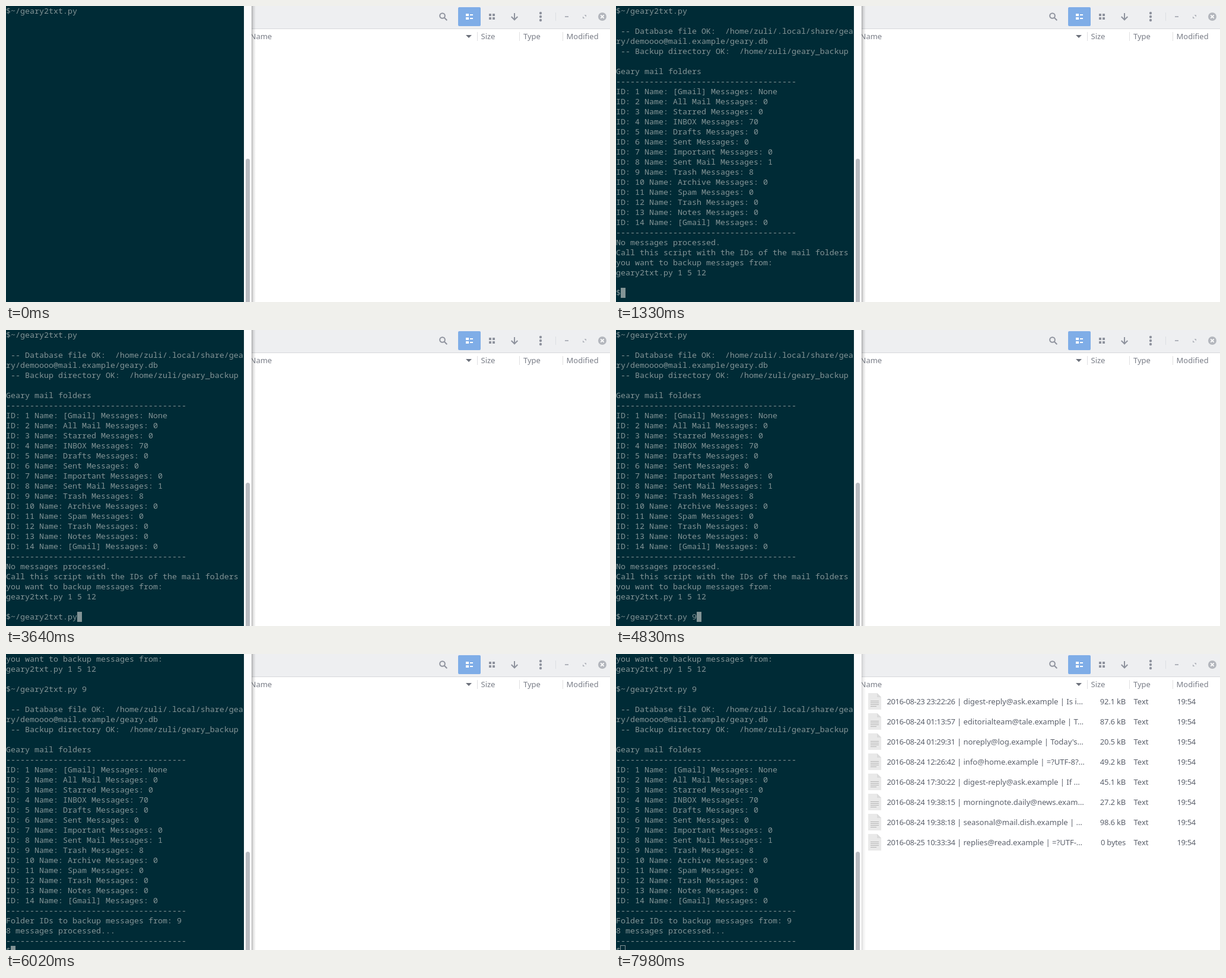
An HTML page that plays this animation: 1018 px wide and 500 px high, repeating every 8050 ms.

```html
<!DOCTYPE html>
<html lang="en">
<head>
<meta charset="utf-8">
<title>Mail backup</title>
<style>
  html, body { margin: 0; width: 100%; height: 100%; overflow: hidden; background: #fff; }
  svg { display: block; width: 1018px; height: 500px; }
  text { white-space: pre; }
  #term { font: 13.333px "Noto Sans Mono", "DejaVu Sans Mono", monospace; fill: #839496; }
  #files { font: 13px "Noto Sans", "Open Sans", sans-serif; fill: #5c616c; }
  .head { fill: #7a7e88; }
  .digits { letter-spacing: -.41px; }
  .icon { fill: #8f939e; }
  .line { fill: none; stroke: #8f939e; stroke-width: 2; }
</style>
</head>
<body>
<svg viewBox="0 0 1018 500">
  <defs>
    <linearGradient id="shade">
      <stop offset="0" stop-color="#000" stop-opacity=".4"/>
      <stop offset=".2" stop-color="#000" stop-opacity=".16"/>
      <stop offset="1" stop-color="#000" stop-opacity="0"/>
    </linearGradient>
    <g id="page">
      <path d="M0 0h15l7 7v21h-22z" fill="#e9e9e9"/>
      <path d="M15 0l7 7h-7z" fill="#dadada"/>
      <path d="M4 13.5h14M4 16.5h14M4 19.5h14M4 22.5h10" stroke="#b4b4b4"/>
    </g>
  </defs>

  <g id="files">
    <rect x="401" width="617" height="500" fill="#fff"/>
    <rect x="401" width="617" height="38" fill="#eeeff1"/>
    <rect x="401" y="38" width="617" height="1" fill="#d6d8dc"/>

    <circle class="line" cx="735.5" cy="16.5" r="4.3"/>
    <path class="line" d="M738.8 19.8l4.5 4.5"/>
    <rect x="762" y="2" width="38" height="32" rx="2" fill="#7fade7"/>
    <path fill="#fff" d="M775 13h5v4h-5zM775 19h5v4h-5zM782 14h5v2h-5zM782 20h5v2h-5z"/>
    <path class="icon" d="M814 13h4v4h-4zM820 13h4v4h-4zM814 19h4v4h-4zM820 19h4v4h-4z"/>
    <path class="line" d="M857 12v11M851.7 18l5.3 5.3 5.3-5.3"/>
    <g class="icon">
      <circle cx="901" cy="12" r="2.2"/><circle cx="901" cy="18" r="2.2"/><circle cx="901" cy="24" r="2.2"/>
    </g>
    <rect x="926" y="11" width="1" height="14" fill="#dcdee2"/>
    <rect x="942" y="17" width="6" height="2" fill="#b0b3bb"/>
    <path d="M974.5 15h3.5v3.5zM972 17.5v3.5h3.5z" fill="#b0b3bb"/>
    <circle cx="1005" cy="18" r="7" fill="#b3b6bd"/>
    <path d="M1002.3 15.3l5.4 5.4m0-5.4l-5.4 5.4" stroke="#fff" stroke-width="1.8"/>

    <g class="head">
      <text x="411.5" y="56">Name</text>
      <text x="800.5" y="56">Size</text>
      <text x="872" y="56">Type</text>
      <text x="944.5" y="56">Modified</text>
      <path d="M775 49h10l-5 5z" fill="#6c717b"/>
    </g>
    <path d="M794.5 44v15M865.5 44v15M938.5 44v15" stroke="#dfdfe1"/>
    <g id="list"></g>
  </g>

  <rect id="shadow" x="414" width="7" height="500" fill="url(#shade)"/>
  <rect x="401" width="13" height="500" fill="#fbfbfc"/>
  <rect id="thumb" x="404" width="7" height="300" rx="3.5" fill="#b9bbc1"/>
  <rect width="401" height="500" fill="#002b36"/>
  <g id="term"></g>
  <rect id="cursor"/>
</svg>
<script>
const $ = id => document.getElementById(id);
const LOOP = 8050, COL = 8, ROW = 17;

const rule = '-'.repeat(38);
const folders = ['[Gmail]', 'All Mail', 'Starred', 'INBOX', 'Drafts', 'Sent', 'Important',
  'Sent Mail', 'Trash', 'Archive', 'Spam', 'Trash', 'Notes', '[Gmail]'];
const counts = ['None', 0, 0, 70, 0, 0, 0, 1, 8, 0, 0, 0, 0, 0];
const report = [
  '',
  ' -- Database file OK:  /home/zuli/.local/share/gea',
  'ry/demoooo@mail.example/geary.db',
  ' -- Backup directory OK:  /home/zuli/geary_backup',
  '',
  'Geary mail folders',
  rule,
  ...folders.map((name, i) => `ID: ${i + 1} Name: ${name} Messages: ${counts[i]}`),
  rule
];
const cmd = '~/geary2txt.py';
const start = ['$' + cmd];
const listed = [
  ...start, ...report,
  'No messages processed.',
  'Call this script with the IDs of the mail folders',
  'you want to backup messages from:',
  'geary2txt.py 1 5 12',
  ''
];
const prompt = typed => [...listed, '$' + typed];
const done = [
  ...prompt(cmd + ' 9'), ...report,
  'Folder IDs to backup messages from: 9',
  '8 messages processed...',
  rule,
  '$'
].slice(25);

// [start time, terminal lines, cursor]; the cursor follows the last line
const OFF = 0, ON = 1, HOLLOW = 2;
const steps = [
  [0, start, OFF], [70, start, ON], [770, start, OFF],
  [1260, [...start, ''], ON],
  [1330, prompt(''), ON], [1890, prompt(''), OFF], [2590, prompt(''), ON], [3220, prompt(''), OFF],
  [3640, prompt(cmd), ON], [4270, prompt(cmd), OFF],
  [4480, prompt(cmd + ' '), ON],
  [4830, prompt(cmd + ' 9'), ON], [5460, prompt(cmd + ' 9'), OFF], [5950, prompt(cmd + ' 9'), ON],
  [6020, done, ON], [6650, done, OFF], [7280, done, ON], [7910, done, OFF], [7980, done, HOLLOW]
];

const mails = [
  ['23 23:22:26', 'digest-reply@ask.example | Is i…', '92.1 kB'],
  ['24 01:13:57', 'editorialteam@tale.example | T…', '87.6 kB'],
  ['24 01:29:31', "noreply@log.example | Today's…", '20.5 kB'],
  ['24 12:26:42', 'info@home.example | =?UTF-8?…', '49.2 kB'],
  ['24 17:30:22', 'digest-reply@ask.example | If …', '45.1 kB'],
  ['24 19:38:15', 'morningnote.daily@news.exam…', '27.2 kB'],
  ['24 19:38:18', 'seasonal@mail.dish.example | …', '98.6 kB'],
  ['25 10:33:34', 'replies@read.example | =?UTF-…', '0 bytes']
];
$('list').innerHTML = mails.map(([date, subject, size], i) => {
  const y = 85 + 34 * i;
  return `<use href="#page" x="425" y="${y - 19}"/>
    <text x="456.5" y="${y}"><tspan class="digits">2016-08-${date}</tspan> | ${subject}</text>
    <text x="859" y="${y}" text-anchor="end" style="letter-spacing:-.2px">${size}</text>
    <text x="872.5" y="${y}">Text</text>
    <text class="digits" x="945.5" y="${y}">19:54</text>`;
}).join('');

function setAttrs(el, attrs) {
  for (const key in attrs) el.setAttribute(key, attrs[key]);
}

function drawCursor(lines, mode) {
  const x = lines[lines.length - 1].length * COL, y = (lines.length - 1) * ROW;
  const hollow = mode === HOLLOW;
  setAttrs($('cursor'), {
    x: hollow ? x - .5 : x, y: hollow ? y - .5 : y, width: COL, height: ROW,
    fill: mode === ON ? '#839496' : 'none',
    stroke: hollow ? '#839496' : 'none'
  });
}

let shown;
function frame(now) {
  const t = now % LOOP;
  const step = steps.filter(s => s[0] <= t).pop();
  $('list').style.display = t >= 6160 ? '' : 'none';
  if (step !== shown) {
    const [, lines, mode] = shown = step;
    $('term').innerHTML = lines.map((s, i) => `<text y="${i * ROW + 13}">${s}</text>`).join('');
    drawCursor(lines, mode);
    $('thumb').setAttribute('y', lines === done ? 334 : 258);
    $('shadow').setAttribute('opacity', mode === HOLLOW ? .5 : 1);
  }
  requestAnimationFrame(frame);
}
frame(0);
</script>
</body>
</html>
```
